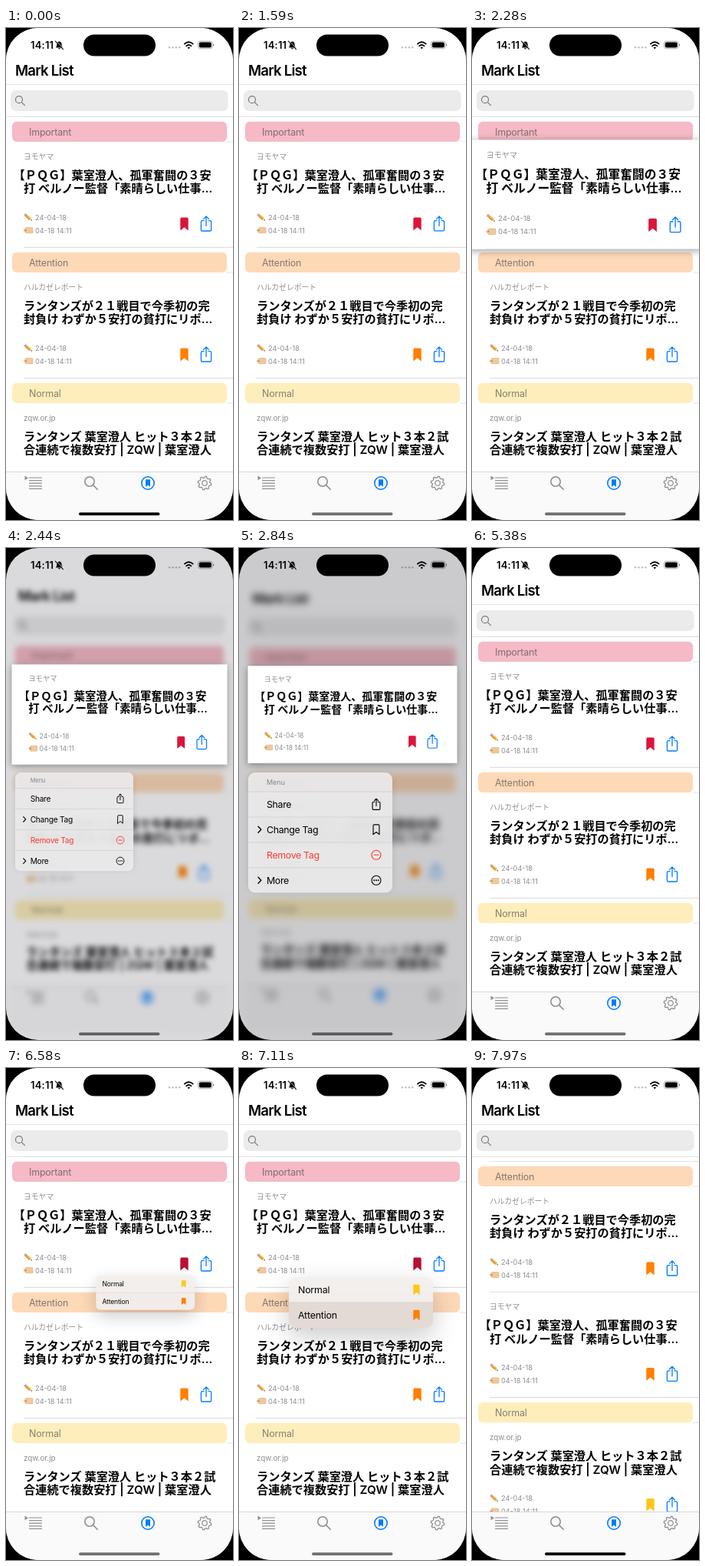
Recreate the animation shown at these times as an HTML page. Size 296 by 640 pixels, loop 9.78 s.

```html
<!DOCTYPE html>
<html lang="ja">
<head>
<meta charset="utf-8">
<title>Mark List</title>
<style>
html, body { margin: 0; width: 100%; height: 100%; overflow: hidden; background: #000; }
svg { display: block; width: 296px; height: 640px; }
text { font-family: Inter, 'Noto Sans CJK JP', 'Noto Sans CJK', sans-serif; white-space: pre; }
</style>
</head>
<body>
<svg id="stage" viewBox="0 0 296 640" xmlns="http://www.w3.org/2000/svg"></svg>
<script>
const LOOP = 9780;
const CRIMSON = '#dc143c', ORANGE = '#ff7f00', YELLOW = '#ffc71a', BLUE = '#007aff', GRAY = '#8e8e93';
const CX = 147.5, ROW_H = 137.3;

// ---- drawing helpers; text is placed by its vertical centre ----
const text = (x, y, size, str, fill = '#000', weight = 400, spacing = 0) =>
  `<text x="${x}" y="${y + size * 0.37}" font-size="${size}" font-weight="${weight}" letter-spacing="${spacing}" fill="${fill}">${str}</text>`;
const rect = (x, y, w, h, r, fill, extra = '') =>
  `<rect x="${x}" y="${y}" width="${w}" height="${h}" rx="${r}" fill="${fill}" ${extra}/>`;
const line = (x1, x2, y, color = '#d6d6da') => rect(x1, y - 0.35, x2 - x1, 0.7, 0, color);
const stroke = (d, color, width = 1.3, extra = '') =>
  `<path d="${d}" fill="none" stroke="${color}" stroke-width="${width}" stroke-linecap="round" stroke-linejoin="round" ${extra}/>`;
const at = (x, y, body, scale = 1) => `<g transform="translate(${x} ${y}) scale(${scale})">${body}</g>`;
const group = (id, body, extra = '') => `<g id="${id}" ${extra}>${body}</g>`;

const MARK = 'M-5.2-6.8Q-5.2-8.4-3.6-8.4H3.6Q5.2-8.4 5.2-6.8V8.4L0 4.2L-5.2 8.4Z';
const bookmark = color => `<path class="mark" d="${MARK}" fill="${color}"/>`;
const share = (color, w) => stroke('M-3-4H-5Q-6.6-4-6.6-2.4V7.8Q-6.6 9.4-5 9.4H5Q6.6 9.4 6.6 7.8V-2.4Q6.6-4 5-4H3M0 3V-9.4M-3.4-6.2L0-9.6L3.4-6.2', color, w);
const magnifier = (r, color, w) =>
  `<circle r="${r}" fill="none" stroke="${color}" stroke-width="${w}"/>` + stroke(`M${r * .72} ${r * .72}L${r * 1.65} ${r * 1.65}`, color, w);

const pencil = `<g transform="rotate(40)">
  <rect x="-7" y="-1.9" width="2.6" height="3.8" rx="1" fill="#ee8f92"/><rect x="-4.6" y="-1.9" width="1.5" height="3.8" fill="#9aa0a6"/>
  <rect x="-3.2" y="-1.9" width="6.8" height="3.8" fill="#f7b52c"/><rect x="-3.2" y=".6" width="6.8" height="1.3" fill="#d98a1c"/>
  <path d="M3.6-1.9L7.4 0L3.6 1.9Z" fill="#ecc798"/><path d="M5.8-.8L7.4 0L5.8.8Z" fill="#333"/></g>`;
const tag = `<path d="M-6 0L-3-3.6H5Q6 -3.6 6-2.6V2.6Q6 3.6 5 3.6H-3Z" fill="#f0c99b" stroke="#d9ac78" stroke-width=".6"/>
  <circle cx="-3.2" r="1" fill="#a87b4e"/>`;

function gear() {
  const points = [];
  for (let i = 0; i < 32; i++) {
    const a = (i + .5) / 32 * 2 * Math.PI, r = i % 4 < 2 ? 8.8 : 6.9;
    points.push(`${(r * Math.cos(a)).toFixed(2)} ${(r * Math.sin(a)).toFixed(2)}`);
  }
  return stroke(`M${points.join('L')}Z`, GRAY, 1.3) + `<circle r="3.3" fill="none" stroke="${GRAY}" stroke-width="1.3"/>`;
}

// ---- list parts, drawn from their own top edge ----
const row = (source, first, second, color, firstX = 23) =>
  rect(0, 0, 296, ROW_H, 0, '#fff') + line(23, 296, ROW_H) +
  text(23, 19, 9.8, source, GRAY) +
  text(firstX, 43, 15.2, first, '#000', 600) + text(23, 60.8, 15.2, second, '#000', 600) +
  at(29, 98.3, pencil, .9) + text(38, 98.4, 9.2, '24-04-18', GRAY) +
  at(29, 115.2, tag) + text(38, 115.2, 9.2, '04-18 14:11', GRAY) +
  at(232.5, 107, bookmark(color)) + at(261, 106.6, share(BLUE, 1.3));
const header = (label, color) =>
  rect(0, .4, 296, 32.3, 0, '#fff') + line(23, 296, 0) + line(288, 296, 32.7) +
  rect(8, 6.5, 280, 26.2, 6, color) + text(30, 19.8, 12.4, label, '#3c3c43', 400, -.15).replace('<text', '<text opacity=".62"');

const leadRow = color => row('ヨモヤマ', '【ＰＱＧ】葉室澄人、孤軍奮闘の３安', '打 ベルノー監督「素晴らしい仕事…', color, 9.5);

// Each part: name, markup, top before and after the re-tag.
const parts = [
  ['leadOld', leadRow(CRIMSON), 148, 136],
  ['important', header('Important', '#f5bac5'), 115.2, 108],
  ['leadNew', leadRow(ORANGE), 310, 291.3],
  ['second', row('ハルカゼレポート', 'ランタンズが２１戦目で今季初の完', '封負け わずか５安打の貧打にリポ…', ORANGE), 318, 154],
  ['attention', header('Attention', '#fed9b8'), 285.3, 121.3],
  ['third', row('zqw.or.jp', 'ランタンズ 葉室澄人 ヒット３本２試', '合連続で複数安打 | ZQW | 葉室澄人', YELLOW), 488, 461.3],
  ['normal', header('Normal', '#feeebb'), 455.3, 428.6]
];

const navBar = rect(0, 0, 296, 115, 0, '#fff') + text(12, 55, 18.6, 'Mark List', '#000', 600, -.8) + line(0, 296, 73.3) +
  rect(6, 81, 283.5, 27, 7, '#ebebec') + at(17, 93.2, magnifier(4.5, '#77777c', 1.2)) + line(0, 296, 115.2);

const tabBar = rect(0, 577, 296, 63, 0, '#fafafa') + line(0, 296, 577.3, '#c6c6ca') +
  `<path d="M24.5 582.5L29 585.3L24.5 588.2Z" fill="${GRAY}"/>` +
  [585, 588.6, 592.2, 595.8, 599.4].map(y => rect(30, y - .6, 17, 1.2, .5, GRAY)).join('') +
  at(109, 590, magnifier(6.2, GRAY, 1.6)) +
  `<circle cx="185" cy="592" r="8.2" fill="none" stroke="${BLUE}" stroke-width="1.6"/>` + at(185, 592, bookmark(BLUE), .58) +
  at(259, 592, gear());

// ---- menus ----
const chevron = y => stroke(`M25 ${y - 4}L28.8 ${y}L25 ${y + 4}`, '#000', 1.4);
const menuItem = (label, y, color, icon) =>
  text(24, y, 12.4, label, color, 400, -.33) + at(167, y, icon);
const ring = (color, inner) => `<circle r="6" fill="none" stroke="${color}" stroke-width="1.1"/>` + inner;
const menuBody = rect(0, 0, 188, 156.5, 0, '#ecebec', 'fill-opacity=".93"') +
  text(24, 13, 9, 'Menu', '#85858a') +
  [25, 58, 91, 124].map(y => line(0, 188, y, '#c9c8cb')).join('') +
  menuItem('Share', 41.3, '#000', at(0, 0, share('#000', 1.5), .75)) +
  menuItem('Change Tag', 74.3, '#000', stroke(MARK, '#000', 1.5, 'transform="scale(.76)"')) +
  menuItem('Remove Tag', 107.3, '#ff3b30', ring('#ff3b30', stroke('M-3 0H3', '#ff3b30', 1.1))) +
  menuItem('More', 140.3, '#000', ring('#000', [-2.7, 0, 2.7].map(x => `<circle cx="${x}" r=".95"/>`).join(''))) +
  at(-12, 0, chevron(74.3) + chevron(140.3));

const tagMenu = rect(65, 272, 188, 66, 9, '#000', 'opacity=".2" filter="url(#wide)" transform="translate(0 12)"') +
  `<g clip-path="url(#tagClip)">` + rect(65, 272, 188, 66, 0, '#f3f0ee', 'fill-opacity=".97"') +
  rect(65, 305, 188, 33, 0, '#e3dad5', 'id="pressed"') + line(65, 253, 305, '#d2ccc9') + '</g>' +
  text(77, 288.5, 12.4, 'Normal', '#000', 400, -.2) + text(77, 321.5, 12.4, 'Attention', '#000', 400, -.2) +
  at(231.5, 288.5, bookmark(YELLOW), .8) + at(231.5, 321.5, bookmark(ORANGE), .8);

// ---- status bar ----
const bell = `<path d="M-4.6 3.4C-3 1.8-3.4-.4-2.8-2.2C-2.3-3.8-1.2-4.6 0-4.6S2.3-3.8 2.8-2.2C3.4-.4 3 1.8 4.6 3.4ZM-1.6 4.3H1.6Q1.2 5.6 0 5.6T-1.6 4.3Z"/>` +
  stroke('M-4.4-5.4L5.6 4.8', '#fff', 1) + stroke('M-5.2-4.8L5 5.6', '#000', 1.1);
const wifi = stroke('M-5.4-2.2Q0-7 5.4-2.2', '#000', 1.8) + stroke('M-3.2.6Q0-2.2 3.2.6', '#000', 1.8) + '<path d="M-1.8 2.6Q0 1.2 1.8 2.6L0 4.5Z"/>';
const statusBar = text(32, 22, 13, '14:11', '#000', 600, .2) + at(69.5, 22, bell) +
  [213.5, 218, 222.4, 226.8 ].map(x => `<circle cx="${x - .5}" cy="25.3" r="1.3" fill="#000" opacity=".25"/>`).join('') +
  at(238.3, 22.8, wifi) +
  rect(250.5, 17.2, 18.6, 9.6, 3, 'none', 'stroke="#000" stroke-opacity=".4" stroke-width=".8"') +
  rect(251.8, 18.5, 16, 7, 1.9, '#000') + rect(270, 20.4, 1.1, 3.2, .5, '#000', 'opacity=".45"') +
  rect(101, 8.5, 94, 28, 14, '#000');

const blurFilter = (id, deviation) =>
  `<filter id="${id}" x="-60" y="0" width="420" height="640" filterUnits="userSpaceOnUse" color-interpolation-filters="sRGB"><feGaussianBlur stdDeviation="${deviation}"/></filter>`;

document.getElementById('stage').innerHTML = `<defs>
  <clipPath id="screen">${rect(0, 0, 296, 640, 42, '#000')}</clipPath>
  <clipPath id="listClip">${rect(0, 115, 296, 462, 0, '#000')}</clipPath>
  <clipPath id="menuClip">${rect(0, 0, 188, 156.5, 9, '#000', 'id="menuMask"')}</clipPath>
  <clipPath id="tagClip">${rect(65, 272, 188, 66, 9, '#000')}</clipPath>
  ${blurFilter('haze', 0)}${blurFilter('wide', 17)}
  <filter id="soft" x="-40" y="-40" width="376" height="220" filterUnits="userSpaceOnUse"><feGaussianBlur stdDeviation="5"/></filter>
  </defs><g clip-path="url(#screen)">${rect(0, 0, 296, 640, 0, '#fff')}` +
  group('backdrop', group('page',
    `<g clip-path="url(#listClip)">${parts.map(([id, body]) => group(id, body)).join('')}</g>` + navBar + tabBar)) +
  rect(0, 0, 296, 640, 0, '#0a0a14', 'id="dim"') +
  group('card', rect(0, 2, 295, ROW_H, 0, '#000', 'id="cardShadow" filter="url(#soft)"') + leadRow(CRIMSON)) +
  group('menu', rect(0, 4, 188, 150, 9, '#000', 'opacity=".1" filter="url(#soft)"') + `<g clip-path="url(#menuClip)">${menuBody}</g>`) +
  group('tagMenu', tagMenu) + statusBar + rect(95, 630.2, 105.5, 3.8, 1.9, '#000', 'id="home"') + '</g>';

const el = id => document.getElementById(id);
const set = (id, attrs) => { for (const key in attrs) el(id).setAttribute(key, attrs[key]); };
const show = (id, visible) => set(id, { display: visible ? 'inline' : 'none' });
const clamp = v => Math.min(1, Math.max(0, v));
const mix = (a, b, p) => a + (b - a) * p;
const ease = p => { p = clamp(p); return p * p * (3 - 2 * p); };
// Critically damped spring from 0 to 1.
const settle = (time, rate) => { const k = Math.max(0, time) * rate; return 1 - (1 + k) * Math.exp(-k); };

function drawContextMenu(t) {
  const lifted = t >= 1590 && t < 5380;
  const closing = t >= 4740 ? settle(t - 4670, .009) : 0;
  const lift = ease((t - 1660) / 600);
  const opened = t < 2350 ? 0 : settle(t - 2310, .021);
  const haze = t < 2350 ? 0 : ease((t - 2300) / 220) * (1 - closing);

  show('card', lifted);
  show('dim', lifted);
  show('menu', lifted && opened > 0);
  if (!lifted) {
    set('page', { transform: '' });
    el('backdrop').removeAttribute('filter');
    return;
  }
  const scale = mix(mix(mix(1, 1.036, lift), .922, opened), 1, closing);
  set('card', { transform: `translate(${CX} 216.6) scale(${scale}) translate(${-CX} ${-ROW_H / 2})` });
  set('cardShadow', { opacity: .38 * lift * (1 - closing) });
  set('dim', { opacity: .21 * haze });

  set('page', { transform: `translate(${CX} 320) scale(${1 - .038 * haze}) translate(${-CX} -320)` });
  if (haze > .01) set('backdrop', { filter: 'url(#haze)' });
  else el('backdrop').removeAttribute('filter');
  el('haze').firstElementChild.setAttribute('stdDeviation', 5 * haze);

  const size = mix(.25, 1, opened) * (1 - .73 * closing);
  set('menu', {
    transform: `translate(12 ${292 - 8 * closing}) scale(${size})`,
    opacity: clamp(opened * 2) * clamp(1.25 - closing * 1.9)
  });
  set('menuMask', { height: 156.5 * (1 - .41 * closing) });
}

function drawTagMenu(t) {
  const visible = t >= 6500 && t < 7720;
  const open = settle(t - 6460, .017) * (1 - ease((t - 7370) / 330));
  show('tagMenu', visible);
  show('pressed', t >= 7105);
  const size = mix(.2, 1, open);
  set('tagMenu', {
    transform: `translate(232 264) scale(${size}) translate(-232 -264)`,
    opacity: clamp(open * 1.6)
  });
  const held = t >= 6500 && t < 7400;
  el('leadOld').querySelector('.mark').setAttribute('fill', held ? '#b90f32' : CRIMSON);
}

function drawList(t) {
  const p = t < 7400 ? 0 : ease((t - 7380) / 350);
  for (const [id, , from, to] of parts) set(id, { transform: `translate(0 ${mix(from, to, p)})` });
  const lifted = t >= 1590 && t < 5380;
  set('leadOld', { opacity: lifted ? 0 : 1 - p });
  set('important', { opacity: 1 - p });
  set('leadNew', { opacity: p });
  show('leadNew', p > 0);
}

function draw(t) {
  drawList(t);
  drawContextMenu(t);
  drawTagMenu(t);
  set('home', { opacity: t >= 1590 && t < 7970 ? .55 : 1 });
}

const start = performance.now();
function tick() {
  draw((performance.now() - start) % LOOP);
  requestAnimationFrame(tick);
}
draw(0);
requestAnimationFrame(tick);
</script>
</body>
</html>
```
